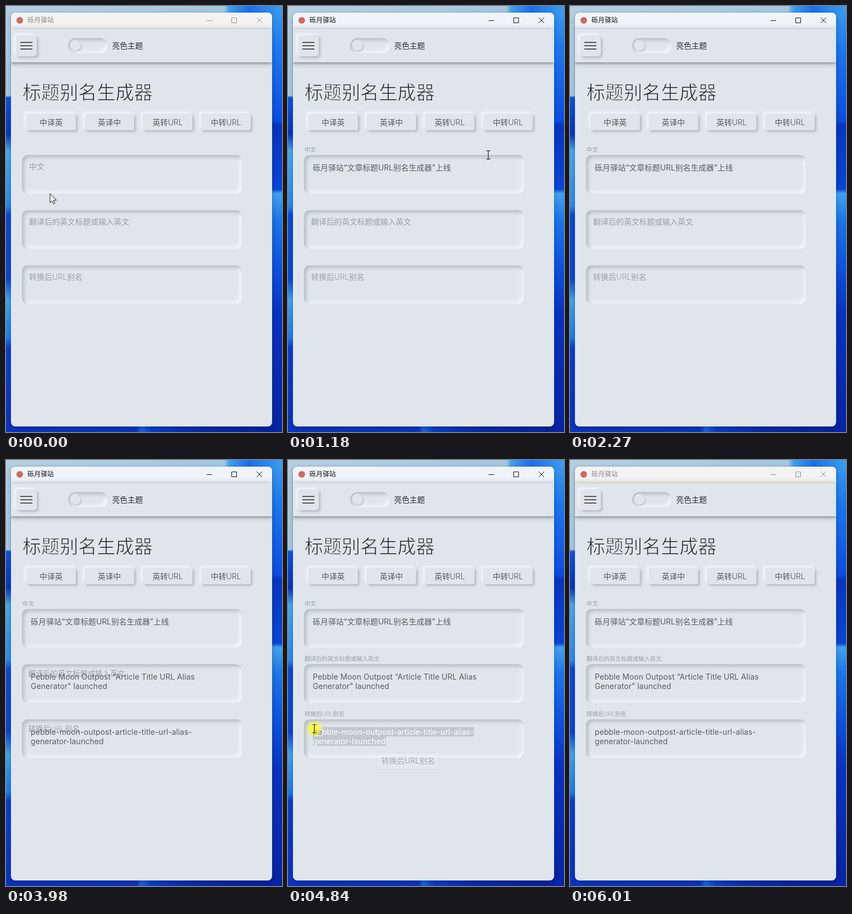
An HTML page for the animation above (6090 ms loop, 502 by 772 pixels).

```html
<!DOCTYPE html>
<html lang="zh-CN">
<head>
<meta charset="utf-8">
<title>标题别名生成器</title>
<style>
html, body { margin: 0; width: 100%; height: 100%; overflow: hidden; }
body { font: 14px/20px Inter, "Noto Sans CJK SC", "Noto Sans CJK", sans-serif; background: #0a46dc; }
#stage { position: relative; width: 502px; height: 772px; overflow: hidden; }
#stage div, #stage svg { position: absolute; box-sizing: border-box; }
.t { white-space: pre; }
#win { left: 9px; top: 12px; width: 475px; height: 750px; border-radius: 8px; background: #e0e5ec;
  box-shadow: 0 0 1px #345, 0 3px 8px rgba(0,0,40,.3); overflow: hidden; }
#bar { width: 475px; height: 30px; }
#head { top: 30px; width: 475px; height: 60px; background: #e0e5ec;
  box-shadow: 0 2px 4px rgba(0,0,0,.25), 0 1px 10px 1px rgba(0,0,0,.25); }
.up { background: #e0e5ec; border-radius: 3px; color: #55585c; text-align: center; line-height: 31px; font-weight: 300;
  box-shadow: 3px 3px 4px #b6babf, -3px -3px 4px #f4f7fa; }
.up.down { color: #777; box-shadow: inset 3px 3px 4px #c6cad0, inset -3px -3px 4px #eceff4; }
.in { border-radius: 10px; box-shadow: inset 4px 4px 6px #b9bdc3, inset -4px -4px 6px #f3f5f8; }
.label { color: #9a9ea1; font-weight: 300; transform-origin: 0 50%; }
.value { color: #5a5c5f; line-height: 17px; letter-spacing: .08px; }
.value span { background: #c3c7cd; color: #fff; }
.tip { height: 31px; padding: 4px 8px; border: 1px solid #c3c7cb; border-radius: 4px; background: #f0f2f4; color: #222; }
</style>
</head>
<body>
<div id="stage">
  <svg width="502" height="772">
    <defs>
      <linearGradient id="left" x2="0" y2="1">
        <stop offset="0" stop-color="#b4cfe1"/><stop offset=".21" stop-color="#a9cbe2"/>
        <stop offset=".215" stop-color="#0c55ea"/><stop offset=".3" stop-color="#0536c4"/>
        <stop offset=".34" stop-color="#49aaf0"/><stop offset=".47" stop-color="#2b8cf0"/>
        <stop offset=".49" stop-color="#0a4be0"/><stop offset=".64" stop-color="#0847dc"/>
        <stop offset=".69" stop-color="#41a6ef"/><stop offset=".78" stop-color="#1e7df0"/>
        <stop offset=".8" stop-color="#0a40d8"/><stop offset="1" stop-color="#0a34c4"/>
      </linearGradient>
      <linearGradient id="right" x2="0" y2="1">
        <stop offset="0" stop-color="#3a9cf0"/><stop offset=".1" stop-color="#1a78f0"/>
        <stop offset=".27" stop-color="#0a4ce4"/><stop offset=".28" stop-color="#0636c0"/>
        <stop offset=".43" stop-color="#0845d8"/><stop offset=".44" stop-color="#40a2f0"/>
        <stop offset=".5" stop-color="#1a76ea"/><stop offset=".62" stop-color="#0c50e0"/>
        <stop offset=".72" stop-color="#0733c2"/><stop offset="1" stop-color="#0624a4"/>
      </linearGradient>
      <linearGradient id="top">
        <stop offset="0" stop-color="#b4cfe1"/><stop offset=".79" stop-color="#a4c8e0"/>
        <stop offset=".81" stop-color="#3f9eee"/><stop offset=".88" stop-color="#1a70ea"/>
        <stop offset="1" stop-color="#3a9cf0"/>
      </linearGradient>
      <linearGradient id="bottom">
        <stop offset="0" stop-color="#0a34c4"/><stop offset=".48" stop-color="#0838c4"/>
        <stop offset=".5" stop-color="#1a68e0"/><stop offset=".54" stop-color="#0a40d0"/>
        <stop offset=".66" stop-color="#0830b8"/><stop offset=".8" stop-color="#0828a8"/>
        <stop offset="1" stop-color="#0624a4"/>
      </linearGradient>
    </defs>
    <path fill="url(#left)" d="M0 0h20v772H0z"/>
    <path fill="url(#right)" d="M474 0h28v772h-28z"/>
    <path fill="url(#bottom)" d="M9 752h475v20H9z"/>
    <path fill="url(#top)" d="M0 0h502v16H0z"/>
  </svg>
  <div id="win">
    <div id="bar"></div>
    <div id="head"></div>
  </div>
  <svg id="chrome" width="502" height="772" fill="none">
    <circle cx="25" cy="26" r="6" fill="#cf6a60" stroke="none"/>
    <path d="M365 26.5h10M410.5 21.5h9v9h-9zM456 21l10 10M466 21l-10 10"/>
  </svg>
</div>
<script>
const LOOP = 6090, STEP = 78.1;
const stage = document.getElementById('stage');
const bar = document.getElementById('bar'), chrome = document.getElementById('chrome');

function add(cls, x, y, w, h, text = '') {
  const el = document.createElement('div');
  el.className = cls;
  el.textContent = text;
  el.style.cssText = `left:${x}px;top:${y}px;` + (w ? `width:${w}px;height:${h}px;` : '');
  stage.append(el);
  return el;
}
// Text whose line is centred on y
const write = (text, x, y, css = '') => {
  const el = add('t', x, y - 10, 0, 0, text);
  el.style.cssText += css;
  return el;
};
const svg = (html, css = '') => {
  stage.insertAdjacentHTML('beforeend', `<svg width="40" height="40" style="overflow:visible;${css}">${html}</svg>`);
  return stage.lastElementChild;
};

const title = write('砾月驿站', 39, 26, 'font-size:12px');
const menu = add('up', 18, 53, 38, 38);
menu.style.borderRadius = '5px';
svg('<path d="M26 66h22M26 72h22M26 78h22" stroke="#5a5458" stroke-width="2"/>', 'left:0;top:0');
add('in', 113, 58, 72, 28).style.borderRadius = '14px';
const knob = add('up', 118, 63, 18, 18);
knob.style.cssText += 'border-radius:50%;box-shadow:1px 1px 3px #a9adb3,-1px -1px 3px #fff';
write('亮色主题', 193, 72, 'color:#262a3c');
// A stroke in the page colour thins the heading to a light weight
write('标题别名生成器', 30, 157,
  'font-size:34px;font-weight:300;letter-spacing:-.2px;color:#1c1e22;-webkit-text-stroke:1px #e0e5ec');

const buttons = ['中译英', '英译中', '英转URL', '中转URL'].map((s, i) => add('up', 37 + 106 * i, 195, 90, 30, s));

const fields = [
  ['中文', '砾月驿站“文章标题URL别名生成器”上线', 234, 859],
  ['翻译后的英文标题或输入英文', 'Pebble Moon Outpost “Article Title URL Alias\nGenerator" launched', 3900, 3975],
  ['转换后URL别名', 'pebble-moon-outpost-article-title-url-alias-\ngenerator-launched', 3900, 3975]
].map(([name, text, lift, fill], i) => {
  const y = 270 + 100 * i;
  add('in', 29, y, 400, 70);
  const label = add('t label', 42, y + 11, 0, 0, name);
  return { label, value: add('t value', 45, y + 14), text, lift, fill };
});
const caret = add('', 45, 285, 1, 16);
caret.style.background = '#555';
const tips = [add('t tip', 81, 324, 0, 0, '请输入中文'), add('t tip', 161, 530, 0, 0, '转换后URL别名')];

const spot = svg('<circle r="12.5" fill="#ff0" fill-opacity=".62"/>');
const cursors = {
  arrow: svg('<path d="M0 0v16.5l3.8-3.6 2.6 5.8 2.6-1.1-2.6-5.7h5.3z" fill="#fff" stroke="#111"/>'),
  beam: svg('<path d="M-3.5-7.5h3l.5.5.5-.5h3M-3.5 7.5h3L0 7l.5.5h3M0-7V7" fill="none" stroke="#222" stroke-width="1.2"/>'),
  hand: svg('<path d="M-2 1q2-3 4 0v7l1-1 3 1 .5 1 2.500 0 .5 1.500 2 .5v6q-1 3-2 5.500h-9q-1-3-4-6.500-4-4-2.500-5 1.500-1 4 2z" fill="#fff" stroke="#111"/>')
};

const path = [
  [0, 80, 340], [78, 80, 340], [234, 82, 303], [391, 82, 303], [703, 232, 317], [781, 232, 317],
  [1250, 375, 266], [1328, 385, 245], [1484, 394, 212], [1718, 394, 212], [2187, 480, 764],
  [4061, 470, 764], [4452, 230, 518], [4686, 230, 518], [4764, 178, 512], [4842, 48, 487],
  [4920, 14, 485], [5155, 14, 485], [5623, 418, 764]
];
const within = (t, a, b) => t >= a && t < b;
const clamp = x => Math.max(0, Math.min(1, x));
const ease = x => { x = clamp(x); return x * x * (3 - 2 * x); };

function pointer(t) {
  let i = 0;
  while (i < path.length - 2 && path[i + 1][0] <= t) i++;
  const [t0, x0, y0] = path[i], [t1, x1, y1] = path[i + 1];
  const p = ease((t - t0) / (t1 - t0));
  return [x0 + (x1 - x0) * p, y0 + (y1 - y0) * p];
}

function draw(t) {
  const active = within(t, 230, 6000);
  bar.style.background = active ? '#eff4fb' : '#f3f3f3';
  title.style.color = active ? '#111' : '#8a8a8a';
  chrome.setAttribute('stroke', active ? '#111' : '#8f8f8f');

  for (const f of fields) {
    const p = ease((t - f.lift) / 360);
    f.label.style.transform = `translate(${-12 * p}px,${-31 * p}px) scale(${1 - p / 4})`;
    f.value.textContent = t >= f.fill ? f.text : '';
  }
  const { value, text } = fields[2];
  if (within(t, 4760, 5380)) {
    const from = t < 4840 ? text.length - 1 : t < 4915 ? 2 : 0;
    const mark = document.createElement('span');
    mark.textContent = text.slice(from);
    value.textContent = text.slice(0, from);
    value.append(mark);
  }
  caret.style.opacity = +within(t, 230, 850);
  tips[0].style.opacity = clamp((t - 310) / 200) * clamp((1020 - t) / 200);
  tips[1].style.opacity = clamp((t - 4370) / 150) * clamp((4895 - t) / 180);

  const [x, y] = pointer(t);
  const shown = t < 2230 || within(t, 4050, 5600);
  const pressed = within(t, 230, 385) || within(t, 1635, 1715) || within(t, 4760, 5150);
  const onButton = within(x, 355, 445) && within(y, 195, 225);
  const inField = within(x, 29, 429) && within(y, 270, 540) && (y - 270) % 100 < 70;
  const beam = inField || within(t, 781, 1300) || within(t, 4760, 5150);
  const shape = onButton ? 'hand' : beam ? 'beam' : 'arrow';
  buttons[3].classList.toggle('down', onButton && shown);
  const place = (el, on) => {
    el.style.display = on ? '' : 'none';
    el.style.transform = `translate(${x}px,${y}px)`;
  };
  place(spot, pressed);
  for (const key in cursors) place(cursors[key], shown && key === shape);
}

function frame() {
  const t = performance.now() % LOOP;
  draw(Math.floor((t + 10) / STEP) * STEP % LOOP);
  requestAnimationFrame(frame);
}
frame();
</script>
</body>
</html>
```
